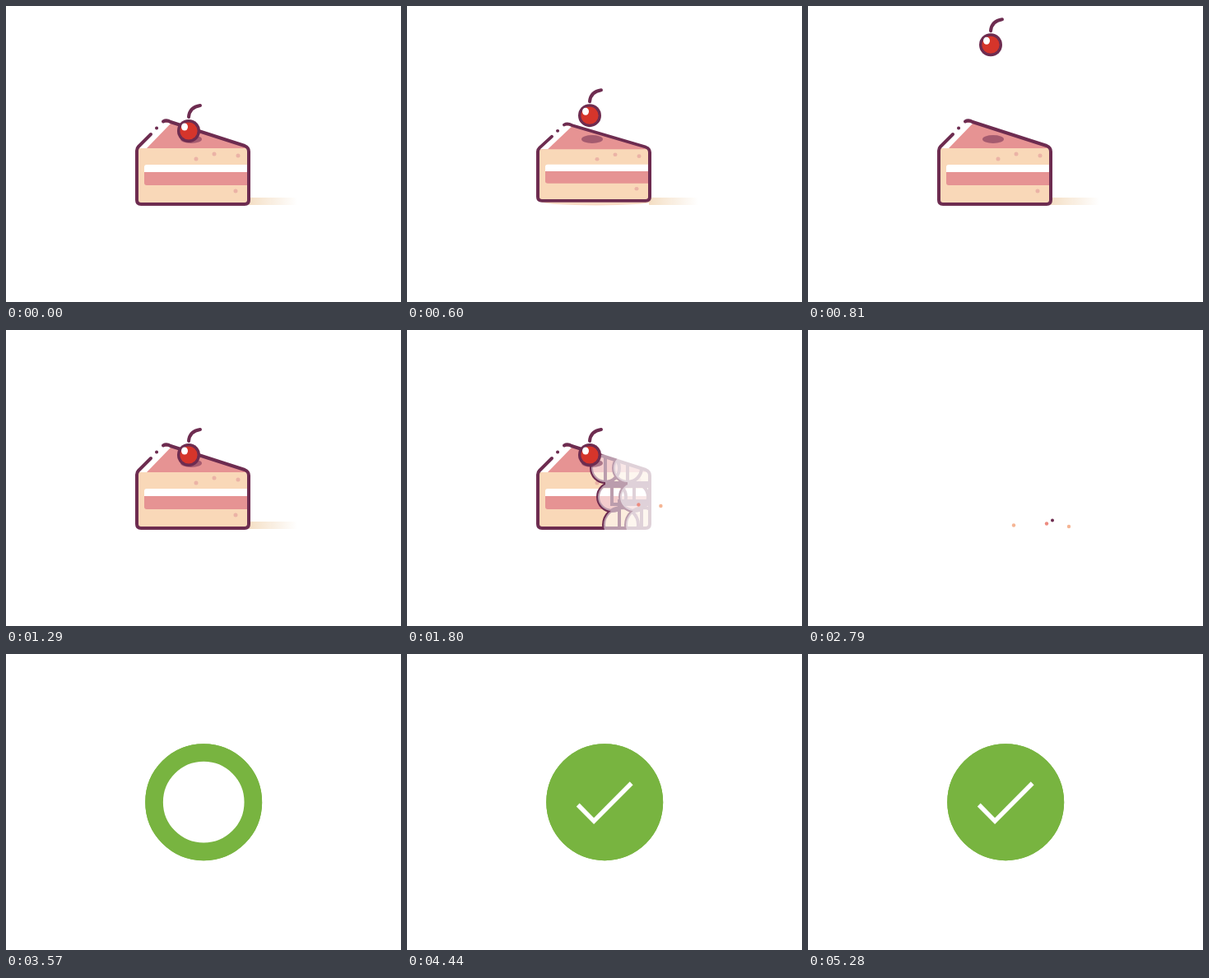
Write an HTML page with a canvas that moves like this. It is 480x360 px and loops after 5.37 s.

```html
<!DOCTYPE html>
<html lang="en">
<head>
<meta charset="utf-8">
<title>Cake</title>
<style>
  html, body { margin: 0; width: 100%; height: 100%; overflow: hidden; background: #fff; }
  canvas { display: block; }
</style>
</head>
<body>
<canvas id="stage" width="480" height="360"></canvas>
<script>
const ctx = document.getElementById('stage').getContext('2d');
const LOOP = 5370, DARK = '#6d2c50', PINK = '#e69393', CREAM = '#f9d8b8', GREEN = '#78b440';
const CAKE_BITES = [[1380, 85], [1650, 58], [1920, 0]];
const CAKE_GONE = 2220, CHERRY_GONE = 2790, CHECK_START = 3160;
const LAUNCH = 578, AIR = 490, FALL = 1930, LAND = 2140;

const clamp = v => Math.min(1, Math.max(0, v));
const span = (t, start, length) => clamp((t - start) / length);
const pulse = (t, start, length) => Math.sin(Math.PI * span(t, start, length));

function bezier(x1, x2) { // cubic-bezier(x1, 0, x2, 1)
  return x => {
    let lo = 0, hi = 1;
    for (let i = 0; i < 20; i++) {
      const s = (lo + hi) / 2, r = 1 - s;
      if (3 * r * r * s * x1 + 3 * r * s * s * x2 + s ** 3 < x) lo = s; else hi = s;
    }
    return lo * lo * (3 - 2 * lo);
  };
}
const easeInOut = bezier(.42, .58), easeStroke = bezier(.65, .45);

function fill(path, color) {
  ctx.fillStyle = color;
  ctx.fill(new Path2D(path));
}

function stroke(path, width, color = DARK) {
  ctx.strokeStyle = color;
  ctx.lineWidth = width;
  ctx.stroke(new Path2D(path));
}

function ellipse(x, y, rx, ry, color) {
  ctx.beginPath();
  ctx.ellipse(x, y, rx, ry, 0, 0, 7);
  ctx.fillStyle = color;
  ctx.fill();
}

function cakeShape() {
  fill('M161 173L195 140L293 172V174H161Z', PINK);
  fill('M161 173L192 142H201L171 173Z', '#fff');
  fill('M160 173H295V236Q295 241 290 241H164Q160 241 160 236Z', CREAM);
  fill('M168 202V196Q168 193 171 193H294V202Z', '#fff');
  fill('M168 202H294V218H171Q168 218 168 215Z', PINK);
  for (const [x, y] of [[231, 186], [253, 180], [282, 182], [279, 225]])
    ellipse(x, y, 2.5, 2.5, '#ebb3a6');
  ctx.lineCap = ctx.lineJoin = 'round';
  stroke('M191 140.500Q195 138 200 141L290 170Q295 172 295 177V236Q295 241 290 241' +
    'H164Q159 241 159 236V176Q159 173 161 171L176 156M183 148.500h.1', 4);
}

function bite(dx) {
  ctx.save();
  ctx.translate(dx, 0);
  ctx.beginPath();
  for (const [x, y, r] of [[183, 168, 17], [191, 203, 17], [202, 237, 21]]) {
    ctx.moveTo(x + r, y);
    ctx.arc(x, y, r, 0, 2 * Math.PI);
  }
  for (const [x, y, h] of [[183, 100, 90], [191, 186, 26], [200, 208, 50]])
    ctx.rect(x, y, 150, h);
  ctx.globalCompositeOperation = 'source-atop';
  ctx.strokeStyle = DARK;
  ctx.lineWidth = 4;
  ctx.stroke();
  ctx.globalCompositeOperation = 'destination-out';
  ctx.fill();
  ctx.restore();
}

function drawCake(t) {
  if (t >= CAKE_GONE) return;
  const squash = 1 - .08 * pulse(t, 540, 125) - .05 * pulse(t, LAUNCH + AIR, 130);
  ctx.save();
  ctx.translate(0, 190 * (1 - squash));
  ctx.scale(1, squash);
  cakeShape();
  ctx.restore();
  for (const [time, dx] of CAKE_BITES) if (t >= time) bite(dx);

  if (t < CAKE_BITES[0][0]) {
    ctx.save();
    ctx.globalCompositeOperation = 'destination-over';
    const fade = ctx.createLinearGradient(290, 0, 354, 0);
    fade.addColorStop(0, '#f3dcc0');
    fade.addColorStop(1, '#f3dcc000');
    ctx.fillStyle = fade;
    ctx.fillRect(294, 233, 60, 9);
    ellipse(230, 237.5, 68, 5, '#f8c9a5aa');
    ctx.restore();
  }
}

function cherryPose(t) {
  if (t < FALL) {
    const u = 2 * span(t, LAUNCH, AIR) - 1;
    return [152 - 105 * (1 - u * u), 1];
  }
  if (t < LAND) return [152 + 77 * span(t, FALL, LAND - FALL) ** 2, 1];
  const u = t - 2160;
  const k = u < 0 ? .3 * (t - LAND) / 20 : .3 * Math.cos(u / 50) * Math.exp(-u / 110);
  return [243 - 14 * (1 - k), 1 - k];
}

function drawCherry(t) {
  if (t >= CHERRY_GONE) return;
  if (t < CAKE_BITES[2][0]) ellipse(225, 162, 13, 5, '#6d2c5088');
  else ellipse(227, 239.500, 12, 4, '#6d2c5088');
  const [y, s] = cherryPose(t), bend = (1 - s) / .3;
  ctx.save();
  ctx.translate(222, y);
  ctx.scale(1, s);
  ctx.lineCap = 'round';
  ellipse(0, 0, 14, 14, DARK);
  ellipse(0, 0, 10.6, 10.6, '#d5352b');
  ellipse(-5, -5, 4, 4.500, '#fff');
  const scale = 1 - .2 * clamp(bend);
  if (t < 2730)
    stroke(`M0 -17Q${1 - 6 * bend} -${29 * scale} ${14 - 14 * bend} -31`, 4);
  ctx.restore();
  if (t >= 2730) {
    ctx.save();
    ctx.globalCompositeOperation = 'destination-out';
    ellipse(236, 222, 13, 12, '#000');
    if (t >= 2760) ellipse(225, 229, 11, 15, '#000');
    ctx.restore();
  }
}

// Landing x, y, radius, colour, launch time
const CRUMBS = [
  [317, 239, 2.2, '#f5b594', 1650], [290, 235.5, 2.2, '#ec8b80', 1650],
  [297, 231.5, 2, DARK, 1920], [250, 237.500, 2.2, '#f5b594', 1920]
];

function drawCrumbs(t) {
  ctx.save();
  ctx.globalAlpha = 1 - span(t, 3020, 130);
  for (const [x, y, r, color, start] of CRUMBS) {
    if (t < start) continue;
    const u = span(t, start, 230);
    ellipse(x - 25 * (1 - u), 195 + (y - 195) * u * u, r, r, color);
  }
  if (t >= CAKE_BITES[2][0] && t < CAKE_GONE) ellipse(180, 183.5, 1.2, 1.2, DARK);
  ctx.restore();
}

function drawCheck(t) {
  const u = t - CHECK_START;
  if (u < 0) return;
  const half = 1 - Math.abs(2 * span(u, 675, 225) - 1);
  ctx.save();
  ctx.translate(240.2, 180.2);
  ctx.scale(1 + .1 * easeInOut(half), 1 + .1 * easeInOut(half));
  ctx.lineCap = 'butt';
  ctx.lineJoin = 'miter';
  ctx.strokeStyle = GREEN;
  ctx.lineWidth = 5.46;
  ctx.beginPath();
  ctx.arc(0, 0, 68.2, 0, 2 * Math.PI * easeStroke(span(u, 0, 450)));
  ctx.stroke();
  const inset = Math.min(71, 76 * easeInOut(span(u, 300, 300)));
  if (inset >= 71) ellipse(0, 0, 71, 71, GREEN);
  else if (inset > 0) {
    ctx.lineWidth = inset;
    ctx.beginPath();
    ctx.arc(0, 0, 71 - inset / 2, 0, 2 * Math.PI);
    ctx.stroke();
  }
  const drawn = easeStroke(span(u, 600, 225));
  if (drawn > 0) {
    ctx.scale(2.73, 2.73);
    ctx.translate(-26, -26);
    ctx.setLineDash([34 * drawn, 48]);
    stroke('M14.1 27.2l7.1 7.2 16.7-16.8', 2, '#fff');
  }
  ctx.restore();
}

function frame(now) {
  const t = now % LOOP;
  ctx.clearRect(0, 0, 480, 360);
  drawCake(t);
  drawCherry(t);
  drawCrumbs(t);
  drawCheck(t);
  requestAnimationFrame(frame);
}
requestAnimationFrame(frame);
</script>
</body>
</html>
```
